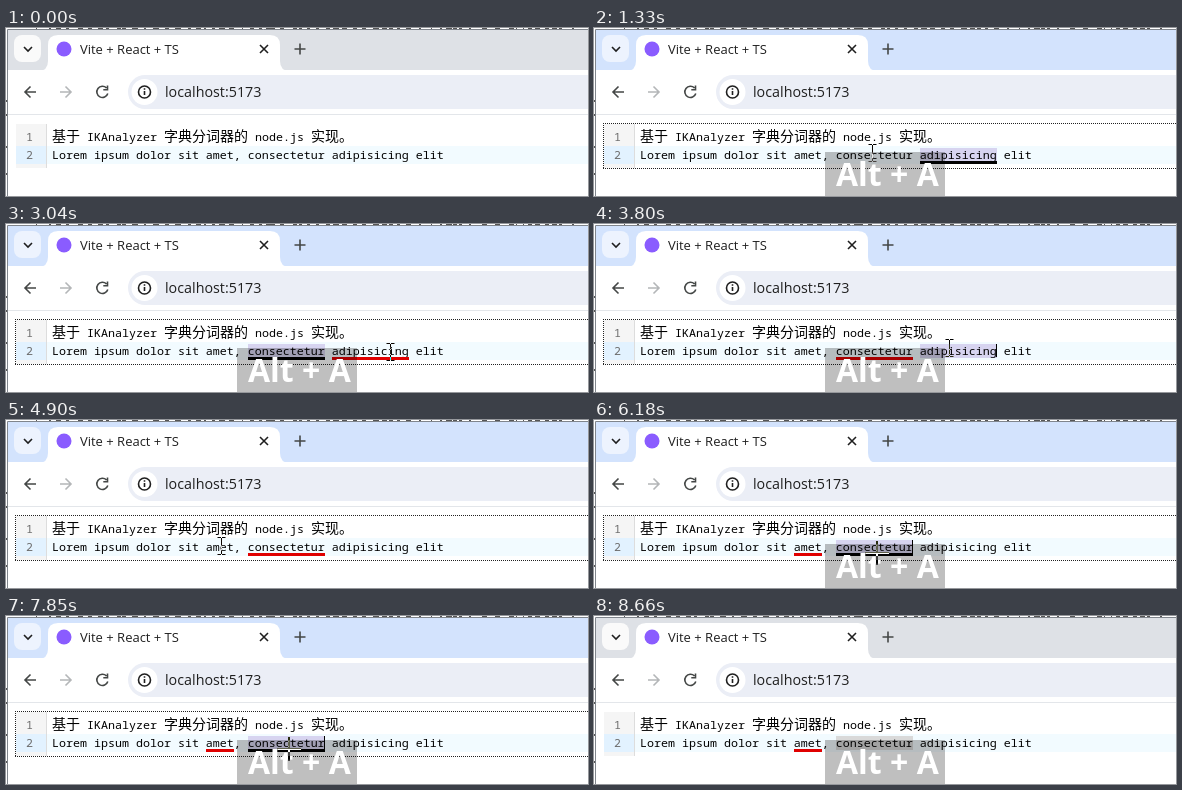
An HTML page for the animation above (8730 ms loop, 582x168 px).

```html
<!DOCTYPE html>
<html lang="en">
<head>
<meta charset="utf-8">
<title>Editor demo</title>
<style>
html, body { margin: 0; width: 100%; height: 100%; overflow: hidden; background: #fff; }
svg { display: block; width: 582px; height: 168px; }
text { white-space: pre; }
.ui { font-family: "Open Sans", "Noto Sans", sans-serif; fill: #1f1f1f; }
.code { font: 11.667px "Noto Sans Mono", "Liberation Mono", monospace; fill: #000; }
.cjk { font: 14px "Noto Sans CJK SC", "Noto Sans CJK", sans-serif; }
.num { fill: #6c6c6c; }
.icon { fill: none; stroke: #444746; stroke-width: 1.6; }
.dark { stroke: #1f1f1f; }
.pale { stroke: #b4b6b8; }
.keys { font: bold 32px "Open Sans", "Noto Sans", sans-serif; fill: #fff; }
.frame { fill: #dee1e6; }
.chip { fill: #fafafa; }
.sel { fill: #d9d9d9; }
.focus .frame { fill: #d3e3fd; }
.focus .chip { fill: #edf3fe; }
.focus .sel { fill: #d7d4f0; }
.outline { fill: none; stroke: #212121; stroke-dasharray: 1 1; visibility: hidden; }
.focus .outline { visibility: visible; }
#pointer { mix-blend-mode: difference; fill: none; stroke: #fff; }
</style>
</head>
<body>
<svg id="stage" viewBox="0 0 582 168">
  <rect width="582" height="168" fill="#fff"/>
  <g id="behind" fill="#555"></g>

  <!-- tab strip -->
  <rect class="frame" x="2" y="2" width="580" height="41"/>
  <path d="M1.5 168V1.5H582" fill="none" stroke="#80858c"/>
  <rect class="chip" x="8" y="7" width="27" height="27" rx="8"/>
  <path class="icon dark" d="M18 19l4 4 4-4"/>
  <path d="M32 43q10 0 10-10V17q0-10 10-10H264q10 0 10 10V33q0 10 10 10Z" fill="#fff"/>
  <circle cx="58" cy="21" r="7.5" fill="#8a5cff"/>
  <text class="ui" x="74" y="25.5" font-size="13">Vite + React + TS</text>
  <path class="icon dark" d="M254 17l8 8m0-8l-8 8"/>
  <path class="icon" d="M288.500 21h11M294 15.500v11"/>

  <!-- toolbar -->
  <rect x="2" y="42" width="580" height="45" fill="#fff"/>
  <rect x="2" y="86" width="580" height="1" fill="#e3e6ea"/>
  <rect x="122" y="47" width="490" height="34" rx="17" fill="#ebeef6"/>
  <circle cx="138.500" cy="64" r="13" fill="#fff"/>
  <path class="icon" d="M30 64H19M24.500 58.500L19 64l5.500 5.500"/>
  <path class="icon pale" d="M54 64H65M59.500 58.500L65 64l-5.500 5.500"/>
  <path class="icon" d="M100.500 60A5.600 5.600 0 1 0 101.800 65.500M101.500 57.500v4.200h-4.200"/>
  <circle class="icon dark" cx="138.500" cy="64" r="6"/>
  <path class="icon dark" d="M138.500 63v4M138.500 60.200v1.600"/>
  <text class="ui" x="159" y="69" font-size="14.300">localhost:5173</text>

  <!-- editor -->
  <rect x="10" y="118" width="572" height="18" fill="#f2fbff"/>
  <rect x="10" y="96" width="30" height="44" fill="#f5f5f5"/>
  <rect x="10" y="118" width="30" height="18" fill="#e2f2ff"/>
  <rect x="40" y="96" width="1" height="44" fill="#ddd"/>
  <g id="sels"></g>
  <text class="code num" x="20" y="113">1</text>
  <text class="code num" x="20" y="131">2</text>
  <text class="code" x="46" y="113"><tspan class="cjk">基于</tspan> IKAnalyzer <tspan class="cjk">字典分词器的</tspan> node.js <tspan class="cjk">实现。</tspan></text>
  <text class="code" x="46" y="131">Lorem ipsum dolor sit amet, consectetur adipisicing elit</text>
  <g id="lines"></g>
  <rect id="caret" y="120" width="1" height="13"/>
  <path class="outline" d="M9 95.500H600M9 140.500H600M9.500 95V141"/>

  <!-- key display -->
  <g id="label">
    <rect id="plate" y="124" height="44" fill="#000" fill-opacity=".25"/>
    <text class="keys" id="key1" y="158">Alt + A</text>
    <text class="keys" id="key2" x="300" y="158">Alt + A</text>
  </g>
  <g id="pointer">
    <path id="beam" d="M-4.500-8.500H-1M0-8.500H3.500M-.5-8V8M-4.500 8.500H-1M0 8.500H3.500"/>
    <path id="cross" d="M-12 0H12M0-12V-1M0 1V12" stroke-width="2"/>
  </g>
</svg>
<script>
const LOOP = 8730;
const $ = id => document.getElementById(id);

function add(parent, attrs) {
  const el = document.createElementNS('http://www.w3.org/2000/svg', 'rect');
  for (const k in attrs) el.setAttribute(k, attrs[k]);
  return $(parent).appendChild(el);
}

// Sliver of another window behind the browser
let seed = 7;
const rnd = () => (seed = seed * 16807 % 2147483647) / 2147483647;
for (let x = 30; x < 575; x += 5 + rnd() * 9) {
  add('behind', { x: Math.round(x), y: 0, width: 1 + Math.round(rnd() * 5), height: 1 });
}
for (let y = 72; y < 168; y += 14 + rnd() * 20) {
  add('behind', { x: 0, y: Math.round(y), width: 1, height: 2 });
}

const words = { amet: [200, 28], con: [242, 77], adi: [326, 77] };
const parts = {};
for (const name in words) {
  const [x, width] = words[name];
  parts[name] = {
    sel: add('sels', { class: 'sel', x, width, y: 120, height: 14 }),
    line: add('lines', { x, width, y: 133, height: 3 })
  };
}

// Each entry changes part of the state from its time on.
// While Alt is held the pointer is a crosshair.
const events = [
  [0, { focus: 0, sel: '', caret: 0, marks: '', keys: 0, alt: 0 }],
  [460, { focus: 1 }],
  [660, { sel: 'adi', caret: 1 }],
  [990, { alt: 1 }],
  [1070, { marks: 'adi', keys: 1 }],
  [1190, { alt: 0 }],
  [1260, { caret: 0 }],
  [1940, { sel: 'con', caret: 1 }],
  [2300, { alt: 1 }],
  [2390, { keys: 0 }],
  [2500, { marks: 'adi con', keys: 1 }],
  [2700, { caret: 0, alt: 0 }],
  [3250, { sel: 'adi', caret: 1 }],
  [3350, { alt: 1 }],
  [3460, { marks: 'con' }],
  [3530, { alt: 0 }],
  [4060, { caret: 0 }],
  [4200, { keys: 0 }],
  [4690, { sel: '' }],
  [4970, { sel: 'amet', caret: 1 }],
  [5180, { alt: 1 }],
  [5380, { marks: 'amet con', keys: 1 }],
  [5510, { alt: 0 }],
  [5580, { caret: 0 }],
  [5780, { sel: 'con', caret: 1 }],
  [6100, { alt: 1 }],
  [6380, { caret: 0 }],
  [6580, { marks: 'amet', caret: 1 }],
  [6780, { marks: 'amet con', keys: 2 }],
  [7180, { alt: 0 }],
  [7380, { caret: 0 }],
  [7650, { alt: 1, caret: 1 }],
  [7780, { keys: 1 }],
  [7920, { marks: 'amet' }],
  [8330, { alt: 0 }],
  [8660, { focus: 0, caret: 0 }]
];
const fades = [[2190, 2390], [3800, 4200]];

// Pointer: time, x, y
const path = [
  [130, 359, 132], [1190, 359, 132], [1330, 279, 125], [1670, 281, 130],
  [2770, 281, 130], [3040, 385, 128], [3200, 385, 125],
  [3730, 385, 125], [3960, 290, 121], [4220, 201, 126], [4489, 201, 126],
  [4490, 216, 126], [5580, 216, 126], [5720, 283, 133], [8660, 283, 133]
];

function pointerAt(t) {
  const i = path.findIndex(p => p[0] > t);
  if (i < 1) return null;
  const [t0, x0, y0] = path[i - 1], [t1, x1, y1] = path[i];
  const k = (t - t0) / (t1 - t0);
  return [Math.round(x0 + (x1 - x0) * k), Math.round(y0 + (y1 - y0) * k)];
}

const show = (el, on) => { el.style.display = on ? '' : 'none'; };

function draw(t) {
  const s = {};
  for (const [at, change] of events) if (at <= t) Object.assign(s, change);

  $('stage').setAttribute('class', s.focus ? 'focus' : '');
  for (const name in parts) {
    const { sel, line } = parts[name];
    show(sel, s.sel === name);
    show(line, s.marks.split(' ').includes(name));
    line.setAttribute('fill', s.sel === name ? '#000' : '#e00000');
  }

  show($('caret'), s.caret && s.sel);
  if (s.sel) $('caret').setAttribute('x', words[s.sel][0] + words[s.sel][1] - 1);

  const wide = s.keys === 2;
  show($('label'), s.keys);
  show($('key2'), wide);
  $('plate').setAttribute('x', wide ? 173 : 231);
  $('plate').setAttribute('width', wide ? 236 : 120);
  $('key1').setAttribute('x', wide ? 184 : 242);
  const fade = fades.find(([a, b]) => t >= a && t < b);
  $('label').style.opacity = fade ? (fade[1] - t) / (fade[1] - fade[0]) : 1;

  const p = pointerAt(t);
  show($('pointer'), p);
  show($('beam'), !s.alt);
  show($('cross'), s.alt);
  if (p) $('pointer').setAttribute('transform', `translate(${p[0]} ${p[1]})`);
}

const start = performance.now();
function tick() {
  draw((performance.now() - start) % LOOP);
  requestAnimationFrame(tick);
}
tick();
</script>
</body>
</html>
```
